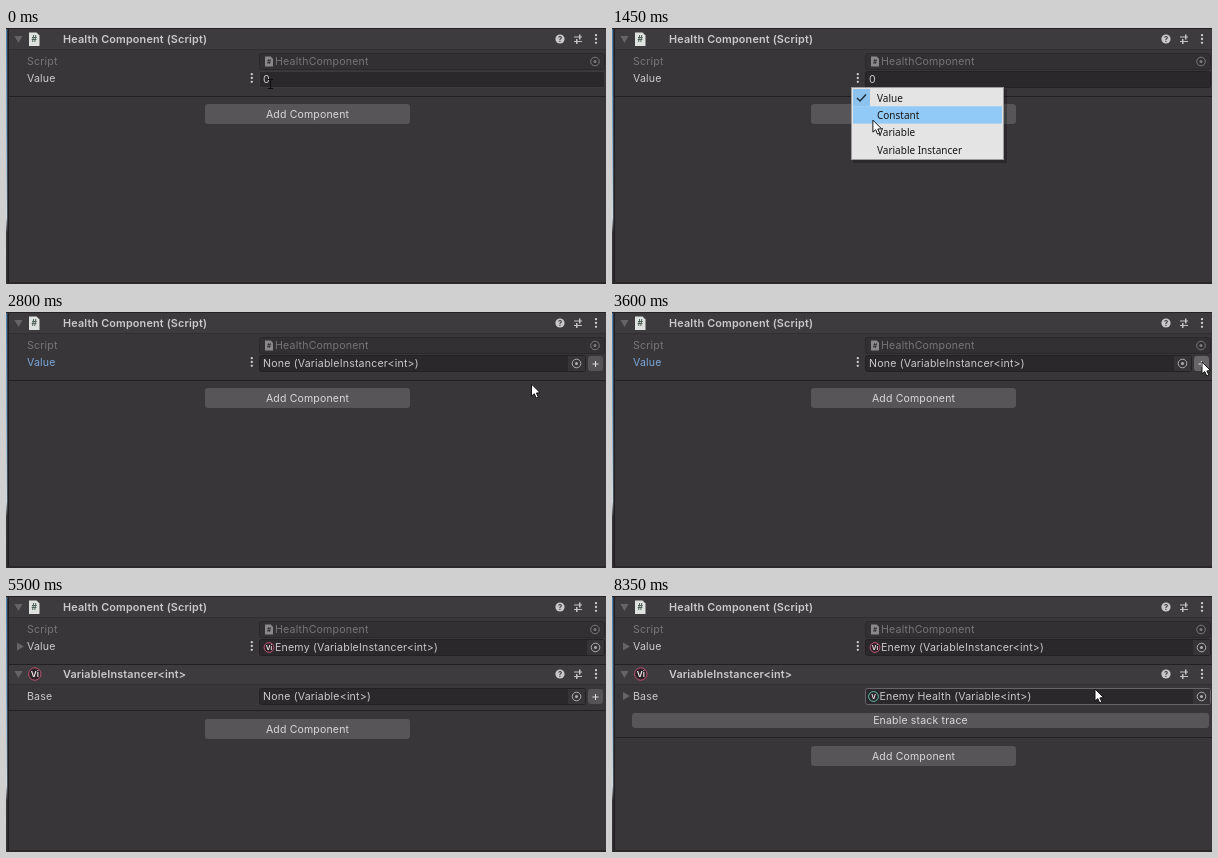
Recreate the animation shown at these times as an HTML page with a canvas. Size 600 by 256 pixels, loop 9300 ms.

```html
<!DOCTYPE html>
<html lang="en">
<head>
<meta charset="utf-8">
<title>Inspector</title>
<style>
html, body { margin: 0; width: 100%; height: 100%; overflow: hidden; background: #393639; }
canvas { display: block; }
</style>
</head>
<body>
<canvas id="stage" width="600" height="256"></canvas>
<script>
const ctx = document.getElementById('stage').getContext('2d');
const LOOP = 9300;
const UI = 'Inter, sans-serif', MENU_FONT = '"Noto Sans", sans-serif';
const BG = '#393639', TEXT = '#cbc9cb', DIM = '#777577', PINK = '#c25672', TEAL = '#5fc4b0';
const EDGE = '#232123', EDGE_HOVER = '#676567';

// Moments at which the inspector changes
const MENU_OPEN = 900, PICK = 1950, ADD = 3650, DRAG = 6300, DROP = 7400;

// Pointer path: time, x, y
const PATH = [
  [0, 264, 55], [100, 264, 55], [450, 246, 48], [1050, 246, 48], [1800, 273, 128],
  [2080, 273, 128], [2820, 526, 72], [2880, 526, 72], [3350, 590, 50], [4180, 590, 50],
  [4500, -20, 231], [6320, -20, 214], [6950, 483, 107], [7250, 483, 93], [LOOP, 483, 93]
];

function pointerAt(t) {
  const i = Math.max(1, PATH.findIndex(p => p[0] > t));
  const [t0, x0, y0] = PATH[i - 1], [t1, x1, y1] = PATH[i];
  const u = (t - t0) / (t1 - t0), e = u * u * (3 - 2 * u);
  return { x: x0 + (x1 - x0) * e, y: y0 + (y1 - y0) * e };
}

function rect(x, y, w, h, fill) {
  ctx.fillStyle = fill;
  ctx.fillRect(x, y, w, h);
}

function box(x, y, w, h, fill, border = fill, radius = 2) {
  ctx.beginPath();
  ctx.roundRect(x + .5, y + .5, w - 1, h - 1, radius);
  ctx.fillStyle = fill;
  ctx.fill();
  ctx.strokeStyle = border;
  ctx.lineWidth = 1;
  ctx.stroke();
}

function disc(x, y, r, fill) {
  ctx.beginPath();
  ctx.arc(x, y, r, 0, 7);
  ctx.fillStyle = fill;
  ctx.fill();
}

function ring(x, y, r, color) {
  ctx.beginPath();
  ctx.arc(x, y, r, 0, 7);
  ctx.strokeStyle = color;
  ctx.lineWidth = 1;
  ctx.stroke();
}

function poly(points, fill, stroke) {
  ctx.beginPath();
  points.forEach(([x, y]) => ctx.lineTo(x, y));
  ctx.closePath();
  ctx.fillStyle = fill;
  ctx.fill();
  if (stroke) {
    ctx.strokeStyle = stroke;
    ctx.lineWidth = 1;
    ctx.stroke();
  }
}

// y is the vertical middle of the capitals
function label(str, x, y, { color = TEXT, size = 10.6, weight = 400, align = 'left', font = UI, track = .18 } = {}) {
  ctx.font = `${weight} ${size}px ${font}`;
  ctx.letterSpacing = track + 'px';
  ctx.textAlign = align;
  ctx.fillStyle = color;
  ctx.fillText(str, x, y + size * .365);
}

function glyph(str, x, y, size, color) {
  label(str, x, y, { color, size, weight: 700, align: 'center', track: 0 });
}

function kebab(x, y) {
  for (const d of [-3.8, 0, 3.8]) disc(x, y + d, 1.15, '#d0ced0');
}

function fold(x, y, open) {
  poly(open ? [[x - 4, y - 3], [x + 4, y - 3], [x, y + 4]] : [[x - 3, y - 4], [x + 4, y], [x - 3, y + 4]], '#666466');
}

function picker(x, y, color = '#b0aeb0') {
  ring(x, y, 4.3, color);
  disc(x, y, 1.5, color);
}

function page(x, y, w, h, color, ink) {
  const c = w * .28;
  poly([[x, y], [x + w - c, y], [x + w, y + c], [x + w, y + h], [x, y + h]], color);
  glyph('#', x + w / 2, y + h / 2, w * .8, ink);
}

function badge(str, x, y, r, color) {
  disc(x, y, r, '#2a2226');
  ring(x, y, r, color);
  glyph(str, x, y, r * 1.3, '#e6dfe1');
}

function header(title, y, top, bottom) {
  rect(3, top, 597, bottom - top, '#3e3b3e');
  rect(3, bottom, 597, 1, '#312f31');
  fold(12.5, y, true);
  label(title, 57, y, { weight: 600, size: 10.8 });
  disc(554, y, 4.6, '#c9c7c9');
  glyph('?', 554, y, 7.5, '#383838');
  rect(568, y - 2.5, 8, 1, '#c4c2c4');
  rect(568, y + 2, 8, 1, '#c4c2c4');
  rect(573, y - 4.5, 1.5, 5, '#c4c2c4');
  rect(570, y, 1.5, 5, '#c4c2c4');
  kebab(590, y);
}

function separator(y) {
  rect(3, y, 597, 1, '#222022');
}

function button(str, x, y, w, h) {
  box(x, y, w, h, '#575557');
  label(str, x + w / 2, y + h / 2, { align: 'center', color: '#dad8da', size: 10.5 });
}

function inside(p, x, y, w, h) {
  return p.x >= x && p.x < x + w && p.y >= y && p.y < y + h;
}

function field(y, right, border = EDGE, fill = '#2a282a') {
  box(253, y - 8, right - 253, 17, fill, border);
}

// Object reference field; an empty one has a "+" button beside it
function objectField(str, y, pointer, ref, fill) {
  const right = ref ? 599 : 580;
  field(y, right, inside(pointer, 253, y - 8, right - 253, 17) ? EDGE_HOVER : EDGE, fill);
  rect(right - 18, y - 7, 17, 15, '#363436');
  picker(right - 9.5, y + .5);
  if (ref) {
    badge(ref.mark, ref.textX - 6, y + .5, 4.9, ref.color);
  } else {
    const hot = inside(pointer, 582, y - 7, 16, 16);
    box(582, y - 7, 15, 15, hot ? '#676567' : '#555355');
    rect(586.5, y + .5, 6, 1, '#ddd');
    rect(589, y - 2, 1, 6, '#ddd');
  }
  label(str, ref ? ref.textX : 257, y + .5);
}

function drawHealth(t, p) {
  header('Health Component (Script)', 11, 1, 21);
  page(23, 4.5, 10.5, 13.5, '#dfe3e0', '#46584f');
  label('Script', 21, 33, { color: DIM });
  field(33, 599, '#2a282a', '#323032');
  page(259, 28.5, 8, 10, '#8a888a', '#302e30');
  label('HealthComponent', 269, 33.5, { color: DIM });
  picker(589, 33.5, '#7c7a7c');

  label('Value', 21, 50.5, { color: t >= PICK && t < ADD ? '#7aa7dc' : TEXT });
  if (inside(p, 239, 43, 14, 16)) box(239, 43, 14, 16, '#474547');
  kebab(245.8, 50);
  if (t < PICK) {
    field(51, 599, inside(p, 253, 43, 346, 17) ? '#3c3a3c' : EDGE);
    label('0', 257, 51.5);
  } else if (t < ADD) {
    objectField('None (VariableInstancer<int>)', 51, p);
  } else {
    fold(14, 50.5, false);
    objectField('Enemy (VariableInstancer<int>)', 51, p, { mark: 'Vi', textX: 269, color: PINK });
  }
  separator(68);
}

function drawInstancer(t, p) {
  header('VariableInstancer<int>', 78, 69, 88);
  badge('Vi', 28.8, 78, 6.2, PINK);
  label('Base', 21, 100);
  if (t < DROP) {
    const dragging = t >= DRAG && p.x > 4;
    const over = dragging && inside(p, 253, 92, 327, 17);
    objectField('None (Variable<int>)', 100, p, null, over ? '#2c5d87' : undefined);
    separator(114);
    if (dragging && p.y > 104) {
      rect(3, 109, 597, 6, '#2a5c88');
      for (let x = 4; x < 600; x += 2) rect(x, 111, 1, 1, '#6d9cc4');
    }
  } else {
    fold(14, 100, false);
    objectField('Enemy Health (Variable<int>)', 100, p, { mark: 'V', textX: 267.5, color: TEAL });
    button('Enable stack trace', 20, 117, 577, 15);
    separator(141);
  }
}

function menuRow(i) {
  return 61 + i * 17.3;
}

function drawMenu(t, p) {
  const items = ['Value', 'Constant', 'Variable', 'Variable Instancer'];
  const text = i => label(items[i], 265, menuRow(i) + 9, { color: '#161616', size: 10, font: MENU_FONT, track: 0 });
  if (t >= MENU_OPEN && t < PICK) {
    ctx.globalAlpha = Math.min(1, .55 + (t - MENU_OPEN) / 250);
    rect(241, 61, 154, 74, 'rgba(0,0,0,.25)');
    rect(239, 59, 153, 73, '#9d9d9d');
    rect(240, 60, 151, 71, '#e4e4e4');
    items.forEach((_, i) => {
      if (inside(p, 239, menuRow(i), 153, 17.3)) rect(241, menuRow(i), 149, 17.3, '#91c9f7');
      if (i === 0) rect(241, 61, 17, 17.3, '#8bc2ee');
      text(i);
    });
    ctx.beginPath();
    ctx.moveTo(245, 70);
    ctx.lineTo(248, 73);
    ctx.lineTo(254, 66.5);
    ctx.strokeStyle = '#1c2a38';
    ctx.lineWidth = 1.4;
    ctx.stroke();
  } else if (t >= PICK && t < PICK + 400) {
    ctx.globalAlpha = 1 - (t - PICK) / 400;
    rect(241, 113, 149, 17.3, '#91c9f7');
    text(3);
  }
  ctx.globalAlpha = 1;
}

function drawPointer(t, { x, y }) {
  if (t < MENU_OPEN && x > 253) {
    rect(x, y - 4, 1, 9, '#0c0c0c');
    rect(x - 2, y - 4, 5, 1, '#0c0c0c');
    rect(x - 2, y + 5, 5, 1, '#0c0c0c');
    return;
  }
  const arrow = [[0, 0], [0, 12], [2.8, 9.6], [4.7, 14], [6.8, 13], [4.9, 8.9], [8.6, 8.6]];
  poly(arrow.map(([dx, dy]) => [x + dx, y + dy]), '#fff', '#151515');
  if (t >= DRAG && t < DROP) {
    ctx.setLineDash([1, 1]);
    ctx.strokeStyle = '#ddd';
    ctx.strokeRect(x + 1.5, y + 11.5, 8, 5);
    ctx.setLineDash([]);
    box(x + 6, y + 14, 8, 8, '#fff', '#222', 0);
    rect(x + 8, y + 17.5, 4, 1, '#111');
    rect(x + 9.5, y + 16, 1, 4, '#111');
  }
}

function drawFrame() {
  rect(0, 0, 600, 256, BG);
  const sky = ctx.createLinearGradient(0, 0, 0, 256);
  [[0, '#4d7ca6'], [.4, '#7fa9c9'], [.74, '#cddce6'], [.8, '#3a383a'], [1, '#353335']]
    .forEach(([at, color]) => sky.addColorStop(at, color));
  rect(0, 0, 1.5, 256, sky);
  rect(1.5, 0, 1.5, 256, '#201e20');
  rect(0, 0, 600, 1, '#242223');
  rect(1.5, 254, 598.5, 2, '#2b282a');
}

function render(t) {
  const p = pointerAt(t);
  drawFrame();
  drawHealth(t, p);
  if (t >= ADD) drawInstancer(t, p);
  button('Add Component', 199, t < ADD ? 76 : t < DROP ? 123 : 150, 205, 20);
  drawMenu(t, p);
  drawPointer(t, p);
}

function tick() {
  render(performance.now() % LOOP);
  requestAnimationFrame(tick);
}
tick();
</script>
</body>
</html>
```
